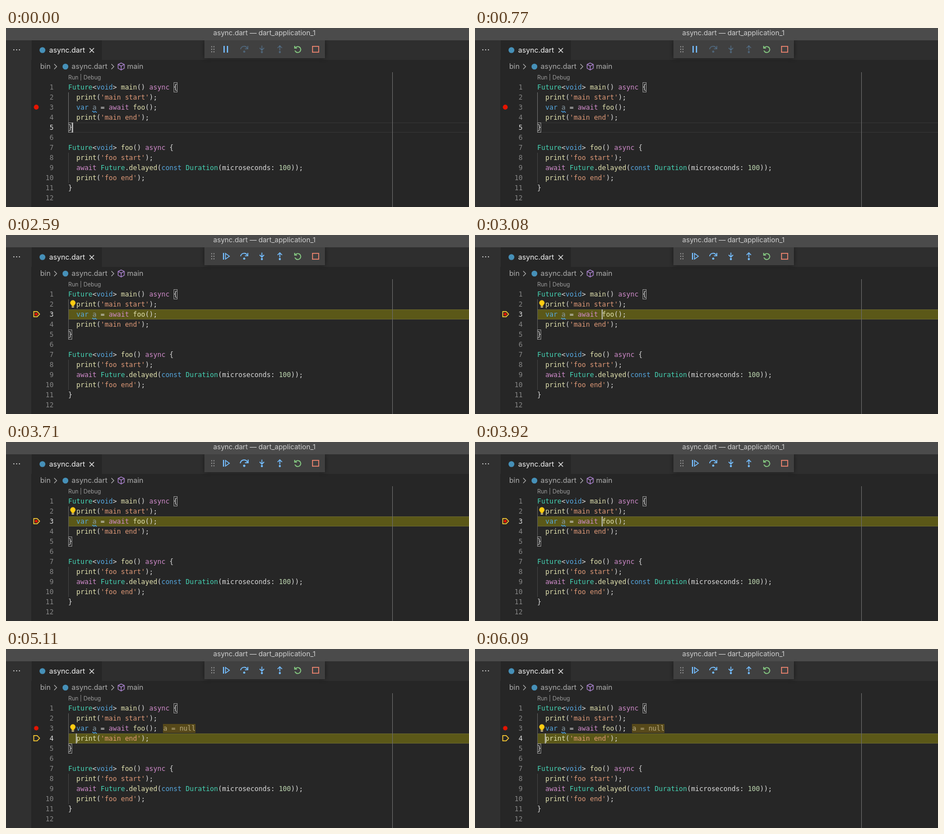
Recreate the animation shown at these times as an HTML page with a canvas. Size 826 by 320 pixels, loop 6160 ms.

```html
<!DOCTYPE html>
<html lang="en">
<head>
<meta charset="utf-8">
<title>Debug session</title>
<style>
html, body { margin: 0; width: 100%; height: 100%; overflow: hidden; background: #262626; }
canvas { display: block; width: 826px; height: 320px; }
</style>
</head>
<body>
<canvas id="stage"></canvas>
<script>
const W = 826, H = 320, LOOP = 6160, TICK = 70;
const canvas = document.getElementById('stage');
const dpr = window.devicePixelRatio || 1;
canvas.width = W * dpr;
canvas.height = H * dpr;
const c = canvas.getContext('2d');

const MONO = '12px "DejaVu Sans Mono", monospace';
const ui = size => size + 'px Inter, sans-serif';
const CH = 7.224, LEFT = 111, PITCH = 18;
const rowMid = n => 87.5 + n * PITCH;

const BLUE = '#75beff', YELLOW = '#ffcc33', RED = '#e51400';
const INK = {
  t: '#45d3b4', k: '#56a8e0', p: '#d08bcb', f: '#e3e3b0',
  s: '#e09a78', n: '#bdd6b0', d: '#dcdcdc', a: '#8a9ba6'
};

// Each token is a colour key, a bar and its text.
const CODE = [
  ['t|Future', 'd|<', 'k|void', 'd|> ', 'f|main', 'd|() ', 'p|async', 'd| {'],
  ['f|  print', 'd|(', "s|'main start'", 'd|);'],
  ['k|  var ', 'a|a', 'd| = ', 'p|await ', 'f|foo', 'd|();'],
  ['f|  print', 'd|(', "s|'main end'", 'd|);'],
  ['d|}'],
  [],
  ['t|Future', 'd|<', 'k|void', 'd|> ', 'f|foo', 'd|() ', 'p|async', 'd| {'],
  ['f|  print', 'd|(', "s|'foo start'", 'd|);'],
  ['p|  await ', 't|Future', 'd|.', 'f|delayed', 'd|(', 'k|const ', 't|Duration', 'd|(microseconds: ', 'n|100', 'd|));'],
  ['f|  print', 'd|(', "s|'foo end'", 'd|);'],
  ['d|}'],
  []
];

// Timing of the session, in ms.
const HIT = 840, NEXT = 4830, BLINK = 500;
const PRESSES = [2230, 3420, 4620];

function rect(x, y, w, h, color) {
  c.fillStyle = color;
  c.fillRect(x, y, w, h);
}

function text(str, x, y, font, color, align = 'left') {
  c.font = font;
  c.fillStyle = color;
  c.textAlign = align;
  c.fillText(str, x, y);
}

function dot(x, y, r, color) {
  c.fillStyle = color;
  c.beginPath();
  c.arc(x, y, r, 0, 7);
  c.fill();
}

function line(points, color, width = 1, close = false) {
  c.strokeStyle = color;
  c.lineWidth = width;
  c.beginPath();
  points.forEach(([x, y]) => c.lineTo(x, y));
  if (close) c.closePath();
  c.stroke();
}

function at(x, y, scale, draw) {
  c.save();
  c.translate(x, y);
  c.scale(scale, scale);
  draw();
  c.restore();
}

function pressScale(t) {
  let k = 0;
  for (const p of PRESSES) {
    const grow = (t - p) / 60, shrink = (p + 310 - t) / 60;
    k = Math.max(k, Math.min(1, grow, shrink));
  }
  return 1 + 0.27 * k;
}

function drawFrame() {
  rect(0, 0, W, H, '#262626');
  rect(0, 22, 45, H - 22, '#303030');
  rect(45, 22, W - 45, 35, '#2e2e2e');
  rect(46, 22, 125, 35, '#262626');
  rect(0, 0, W, 22, '#4b4b4b');
  text('async.dart — dart_application_1', 461, 12.5, ui(12.3), '#cfcfcf', 'center');

  for (const x of [14, 19, 24]) dot(x, 39, 1.1, '#d0d0d0');

  dot(65, 39.5, 5.2, '#4690b8');
  text('async.dart', 77, 44.3, ui(12.8), '#f2f2f2');
  line([[149, 36], [157, 44]], '#e0e0e0', 1.2);
  line([[157, 36], [149, 44]], '#e0e0e0', 1.2);

  const crumb = '#adadad';
  text('bin', 61, 73.3, ui(12.8), crumb);
  text('async.dart', 117, 73.3, ui(12.8), crumb);
  text('main', 216, 73.3, ui(12.8), crumb);
  dot(106, 69, 5.2, '#4690b8');
  for (const x of [86, 188]) line([[x, 64.5], [x + 4.5, 69], [x, 73.5]], crumb, 1.1);

  const violet = '#b388d9';
  line([[205.5, 62.5], [211, 65.2], [211, 72], [205.5, 75], [200, 72], [200, 65.2]], violet, 1.2, true);
  line([[200, 65.2], [205.5, 68], [211, 65.2]], violet, 1.2);
  line([[205.5, 68], [205.5, 75]], violet, 1.2);

  text('Run | Debug', 111, 92, ui(10), '#9a9a9a');
}

function stepOver() {
  c.strokeStyle = BLUE;
  c.lineWidth = 1.6;
  c.beginPath();
  c.moveTo(-6.5, 0);
  c.bezierCurveTo(-5, -6.8, 3.5, -7, 5.5, -1.2);
  c.stroke();
  line([[6.4, -6], [6.4, -0.8], [1.2, -0.8]], BLUE, 1.6);
  dot(0, 4.2, 1.9, BLUE);
}

function stepArrow(dir) {
  const tip = dir > 0 ? 1.6 : -6.2, tail = dir > 0 ? -6.5 : 2;
  line([[0, tail], [0, tip]], BLUE, 1.6);
  line([[-4, tip - dir * 4], [0, tip], [4, tip - dir * 4]], BLUE, 1.6);
  dot(0, 5, 1.9, BLUE);
}

function restart() {
  const green = '#89d185';
  c.strokeStyle = green;
  c.lineWidth = 1.6;
  c.beginPath();
  c.arc(0.5, 0.5, 5.3, -2.5, 2.8);
  c.stroke();
  line([[-5, -6], [-5, -2], [-0.8, -2]], green, 1.6);
}

function drawToolbar(t, paused) {
  c.save();
  c.beginPath();
  c.rect(0, 22, W, 60);
  c.clip();
  c.shadowColor = 'rgba(0,0,0,.45)';
  c.shadowBlur = 7 * dpr;
  rect(354, 22, 215, 32, '#404040');
  c.restore();

  for (const x of [366, 370]) for (const y of [33.5, 38, 42.5]) rect(x, y - 1, 2, 2, '#8c8c8c');

  if (paused) {
    rect(387, 32, 2, 12, BLUE);
    line([[391.5, 33], [391.5, 43], [398.5, 38]], BLUE, 1.5, true);
  } else {
    rect(388, 32, 2.2, 12, BLUE);
    rect(394, 32, 2.2, 12, BLUE);
  }
  c.globalAlpha = paused ? 1 : 0.3;
  at(425, 38, pressScale(t), stepOver);
  at(456.5, 38, 1, () => stepArrow(1));
  at(488.5, 38, 1, () => stepArrow(-1));
  c.globalAlpha = 1;
  at(520, 38, 1, restart);
  c.strokeStyle = '#f48771';
  c.lineWidth = 1.5;
  c.strokeRect(546.8, 32.8, 11, 10.5);
}

function drawCode(active) {
  CODE.forEach((tokens, i) => {
    const base = rowMid(i + 1) + 4.5;
    text(String(i + 1), 85, base, MONO, i + 1 === active ? '#dedede' : '#858585', 'right');
    let col = 0;
    for (const token of tokens) {
      const str = token.slice(2);
      text(str, LEFT + col * CH, base, MONO, INK[token[0]]);
      col += str.length;
    }
  });

  const wave = [];
  for (let x = 0; x <= 8; x += 0.5) wave.push([154 + x, 149.7 - 1.2 * Math.sin(x * Math.PI / 2)]);
  line(wave, '#4ba3e8', 1.1);

  c.strokeStyle = '#929292';
  c.lineWidth = 1;
  c.strokeRect(299.5, 97.5, 6, 17);
  c.strokeRect(111.5, 169.5, 6, 17);
}

function tag(y) {
  c.lineJoin = 'round';
  line([[49.5, y - 4.8], [55.5, y - 4.8], [60, y], [55.5, y + 4.8], [49.5, y + 4.8]], YELLOW, 1.5, true);
  c.lineJoin = 'miter';
}

function bulb(y) {
  dot(119.3, y - 2.2, 4.7, '#ffcc12');
  rect(117, y + 1, 4.6, 2.4, '#ffcc12');
  rect(117.2, y + 4, 4.2, 2.2, '#d8c68a');
}

function drawGutter(active, paused) {
  const y = rowMid(3);
  if (!paused) {
    dot(54, y, 4.4, RED);
  } else if (active === 3) {
    tag(y);
    dot(54, y, 2.6, RED);
  } else {
    dot(54, y, 3.6, RED);
    for (let i = 0; i < 8; i++) dot(54 + 3.4 * Math.cos(i * Math.PI / 4), y + 3.4 * Math.sin(i * Math.PI / 4), 0.9, RED);
    tag(rowMid(4));
  }
}

function render(t) {
  const paused = t >= HIT;
  const active = t >= NEXT ? 4 : paused ? 3 : 5;
  const top = rowMid(active) - 8.5;

  c.setTransform(dpr, 0, 0, dpr, 0, 0);
  c.textBaseline = 'alphabetic';
  drawFrame();

  if (paused) {
    rect(LEFT, top, W - LEFT, 18, '#5b5818');
    rect(LEFT, top, W - LEFT, 1, '#67642c');
    rect(LEFT, top + 17, W - LEFT, 1, '#67642c');
  } else {
    rect(LEFT, top, W - LEFT, 1, '#353535');
    rect(LEFT, top + 17, W - LEFT, 1, '#353535');
  }
  rect(111, 115, 1, 54, active === 5 ? '#6b6b6b' : '#5c5c5c');
  rect(111, 223, 1, 54, '#434343');
  rect(689, 79, 1, H - 79, '#6b6b6b');

  if (active === 4) {
    rect(280, 134, 58, 16, '#57491a');
    text('a = null', 280.5, rowMid(3) + 4.5, MONO, '#b9ab80');
  }
  drawCode(active);
  drawGutter(active, paused);
  if (paused) bulb(rowMid(active - 1));

  const since = paused ? t - (active === 4 ? NEXT : HIT) : t + BLINK - 350 + 10;
  if (since % (2 * BLINK) < BLINK) {
    const x = { 3: 226, 4: 124.7, 5: 118 }[active];
    rect(x, top, 1.6, 18, '#c8c8c8');
  }
  drawToolbar(t, paused);
}

function loop() {
  const t = performance.now() % LOOP;
  render(Math.floor(t / TICK) * TICK);
  requestAnimationFrame(loop);
}
loop();
</script>
</body>
</html>
```
